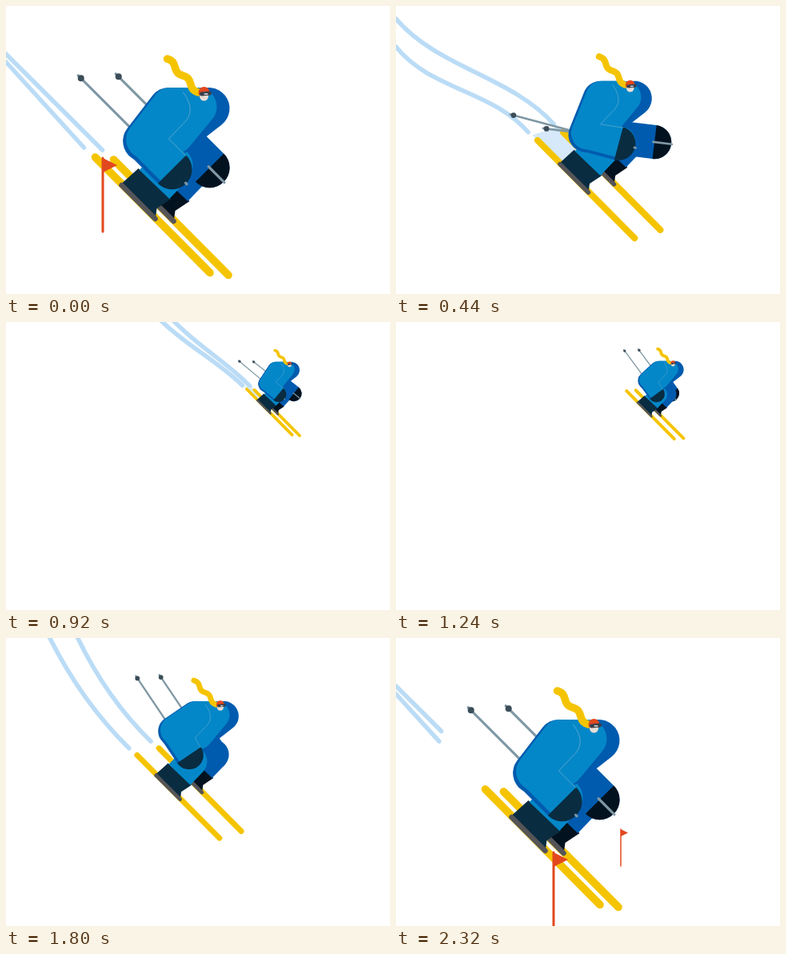
An HTML page with a canvas for the animation above (2.36 s loop, 480 by 360 pixels).

```html
<!DOCTYPE html>
<html lang="en">
<head>
<meta charset="utf-8">
<title>Skier</title>
<style>
html, body { margin: 0; width: 100%; height: 100%; overflow: hidden; background: #fff; }
canvas { display: block; width: 480px; height: 360px; }
</style>
</head>
<body>
<canvas id="stage" width="480" height="360"></canvas>
<script>
const LOOP = 2360, STEP = 40;
const ctx = document.getElementById('stage').getContext('2d');
const C = {
  light: '#0487c8', blue: '#005bae', navy: '#0a2c40', night: '#03121f',
  ski: '#f5c400', snow: '#bbdcf6', haze: '#d6e9fa', pole: '#7f98a4',
  basket: '#3b4d58', bind: '#555558', flag: '#e2481e'
};

// time, ski tail x and y, scale, lean (1 right, -1 left),
// where the tracks meet the edge (above 0 along the top, below 0 down the left)
const route = [
  [0, 111.5, 189, 1, 0, -60],
  [440, 177, 168, .845, 1, -16],
  [600, 247, 131, .625, 1, 83],
  [920, 301, 84, .395, .22, 209],
  [1560, 257, 92, .47, -1, 200],
  [2000, 103, 187, .927, -1, -16]
];
for (const t of [2320, LOOP]) route.push([t, ...route[0].slice(1)]);

// Monotone cubic interpolation along the route
function sample(rows, t) {
  const last = rows.length - 1;
  let i = 0;
  while (t >= rows[i + 1][0]) i++;
  const h = rows[i + 1][0] - rows[i][0], u = (t - rows[i][0]) / h, v = u * u, w = v * u;
  return rows[i].map((a, c) => {
    const slope = k => (rows[k + 1][c] - rows[k][c]) / (rows[k + 1][0] - rows[k][0]);
    const tangent = k => {
      if (k === 0 || k === last) return slope(Math.min(k, last - 1));
      const p = slope(k - 1), q = slope(k);
      return p * q > 0 ? 2 * p * q / (p + q) : 0;
    };
    const b = rows[i + 1][c];
    return a * (2 * w - 3 * v + 1) + b * (3 * v - 2 * w)
      + h * (tangent(i) * (w - 2 * v + u) + tangent(i + 1) * (w - v));
  });
}

const at = (p, x, y, s) => [p[0] + x * s, p[1] + y * s];
const along = (p, deg, d) => at(p, Math.cos(deg * Math.PI / 180), Math.sin(deg * Math.PI / 180), d);

// All joints follow from tail, scale and lean
function pose(t) {
  const [, x, y, s, lean, edge] = sample(route, t);
  const l2 = lean * lean;
  const tail1 = [x, y], tail2 = at(tail1, 23 + 15 * l2, 3 - 15 * l2, s);
  const a1 = 45 - 20.5 * lean - 9.5 * l2, a2 = a1 - 8 * Math.max(0, lean);
  const shoulder = at(tail1, 126 - 4 * lean + 5 * l2, -61 + 3 * lean - 4 * l2, s);
  const elbow1 = along(shoulder, 148 - 12 * lean, 77 * s);
  const hand1 = along(elbow1, a1, 50 * s);
  const hand2 = at(hand1, 47 + 6 * lean, -2, s);
  const elbow2 = along(hand2, a2, -50 * s);
  return { s, lean, edge, tail1, tail2, a1, a2, shoulder, elbow1, hand1, elbow2, hand2 };
}

function path(points, close) {
  ctx.beginPath();
  points.forEach(p => ctx.lineTo(...p));
  if (close) ctx.closePath();
}
function line(color, width, ...points) {
  path(points);
  ctx.strokeStyle = color;
  ctx.lineWidth = width;
  ctx.stroke();
}
function fill(color, ...points) {
  path(points, true);
  ctx.fillStyle = color;
  ctx.fill();
}
function dot(color, p, r, from = 0, to = 7) {
  ctx.beginPath();
  ctx.arc(...p, r, from, to);
  ctx.fillStyle = color;
  ctx.fill();
}
function mitten(color, p, deg, r) {
  const a = deg * Math.PI / 180;
  dot(color, p, r, a - Math.PI / 2, a + Math.PI / 2);
}

function flag(x, y, k) {
  line(C.flag, 3 * k, [x, y], [x, y + 92 * k]);
  fill(C.flag, [x, y], [x + 18 * k, y + 9 * k], [x, y + 18 * k]);
}
function flags(t) {
  const n = ((t < 200 ? t + LOOP : t) - 2320) / STEP;
  if (n < -2 || n > 3) return;
  if (n <= 0) flag(281 - 38 * n, 239 - 39 * n, .5);
  flag(197 - 76 * n, 268 - 78 * n, 1);
}

function tracks(t, { s, lean, edge, tail1, tail2 }) {
  const fresh = t >= 2280;
  if (t === 2280 || (t > 1240 && t < 1640) || (t > 2200 && !fresh)) return;
  const drift = fresh ? 0 : Math.max(0, t < 1640 ? t - 1120 : t - 2020) * .85;
  const bend = Math.abs(lean);
  ctx.save();
  ctx.translate(-drift, -drift);
  if (fresh) ctx.setLineDash([(t - 2280) * 2, 400]);
  ctx.strokeStyle = C.snow;
  ctx.lineWidth = 5.5;
  [tail2, tail1].forEach((tail, i) => {
    const e = edge - i * (10 + 25 * bend);
    const a = e < 0 ? [0, -e] : [e, -2], b = at(tail, -14, -12, s);
    const mid = (u, off) => [a[0] + (b[0] - a[0]) * u - .6 * off, a[1] + (b[1] - a[1]) * u + .8 * off];
    ctx.beginPath();
    ctx.moveTo(...a);
    ctx.bezierCurveTo(...mid(1 / 3, 6 * lean + 16 * bend), ...mid(2 / 3, -15 * lean - 5 * bend), ...b);
    ctx.stroke();
  });
  ctx.restore();
  if (t > 100 && t < 1120) {
    fill(C.haze, at(tail1, -8, -8, s), at(tail2, -8, -8, s), at(tail2, 40, 40, s), at(tail1, 40, 40, s));
  }
}

function ski(tail, s) {
  line(C.ski, 9.6 * s, tail, at(tail, 143.5, 144.5, s));
}
function leg(tail, s, bootColor, color) {
  const knee = at(tail, 96, 11, s);
  fill(bootColor, at(tail, 33, 33, s), at(tail, 54, 14, s), at(tail, 95, 52, s),
    at(tail, 77, 64, s), at(tail, 75, 78, s));
  line(C.bind, 6.5 * s, at(tail, 33, 35, s), at(tail, 75, 77, s));
  ctx.lineCap = 'butt';
  line(color, 52 * s, at(tail, 74, 34, s), knee);
  ctx.lineCap = 'round';
  dot(color, knee, 26 * s);
}

function head(p, s) {
  const hair = [];
  for (let u = 0; u <= 1; u += 1 / 16) {
    const w = 1.7 * Math.sin(u * 4 * Math.PI);
    hair.push(at(p, -47 + 39 * u + w, -43 + 42 * u - w, s));
  }
  line(C.ski, 9.5 * s, ...hair);
  dot(C.flag, at(p, -1, -1, s), 7 * s);
  dot('#e8ded6', at(p, -1, 4, s), 5.5 * s);
  line('#39404a', 5 * s, at(p, -4, 1, s), at(p, 6, 0, s));
  line('#b9c4c9', 2 * s, at(p, 0, 1, s), at(p, 3, 1, s));
}

function skier(p) {
  const { s, lean, tail1, tail2, a1, a2, shoulder, elbow1, hand1, elbow2, hand2 } = p;
  const belly = at(shoulder, -29, 35, s), back = at(shoulder, -34, 0, s);
  // distances run along the pole from the hand
  const pole = (hand, a, from, to) =>
    line(C.pole, 3.2 * s, along(hand, a, from * s), along(hand, a, to * s));

  ski(tail2, s);
  ski(tail1, s);
  for (const [hand, a] of [[hand1, a1], [hand2, a2]]) {
    pole(hand, a, -166, -50);
    dot(C.basket, along(hand, a, -161 * s), 4 * s);
  }

  // far side: the hand slips behind the knee when leaning left
  const farArm = () => {
    line(C.blue, 50 * s, elbow2, hand2);
    mitten(C.night, hand2, a2, 25 * s);
    pole(hand2, a2, -2, 26);
  };
  if (lean < -.5) farArm();
  leg(tail2, s, C.night, C.blue);
  if (lean >= -.5) farArm();
  line(C.blue, 52 * s, at(shoulder, 16, 0, s), belly);

  // near side
  leg(tail1, s, C.navy, C.light);
  const body = (color, r, d) => {
    const m = q => at(q, d, -d, s);
    fill(color, ...[elbow1, back, shoulder, belly].map(m));
    ctx.strokeStyle = color;
    ctx.lineWidth = 2 * r * s;
    ctx.stroke();
    line(color, (2 * r - 2) * s, m(elbow1), m(hand1));
  };
  body(C.blue, 26, 0);
  body(C.light, 24, 2);
  mitten(C.navy, hand1, a1, 25 * s);
  if (lean >= -.5) pole(hand1, a1, 24, 26);

  // sleeve seam
  ctx.beginPath();
  ctx.moveTo(...at(shoulder, -16, -20, s));
  ctx.quadraticCurveTo(...at(shoulder, 2, 4, s), ...at(shoulder, -17, 20, s));
  ctx.lineTo(...at(shoulder, -34, 38, s));
  ctx.lineTo(...along(hand1, a1 - 90, 24 * s));
  ctx.strokeStyle = '#5fa9d0';
  ctx.lineWidth = Math.max(.5, .9 * s);
  ctx.stroke();

  head(at(shoulder, 11, -19, s), s);
}

function draw(now) {
  const t = Math.floor((now % LOOP) / STEP) * STEP;
  const p = pose(t);
  ctx.fillStyle = '#fff';
  ctx.fillRect(0, 0, 480, 360);
  ctx.lineCap = ctx.lineJoin = 'round';
  tracks(t, p);
  skier(p);
  flags(t);
}

const start = performance.now();
function tick() {
  draw(performance.now() - start);
  requestAnimationFrame(tick);
}
tick();
</script>
</body>
</html>
```
